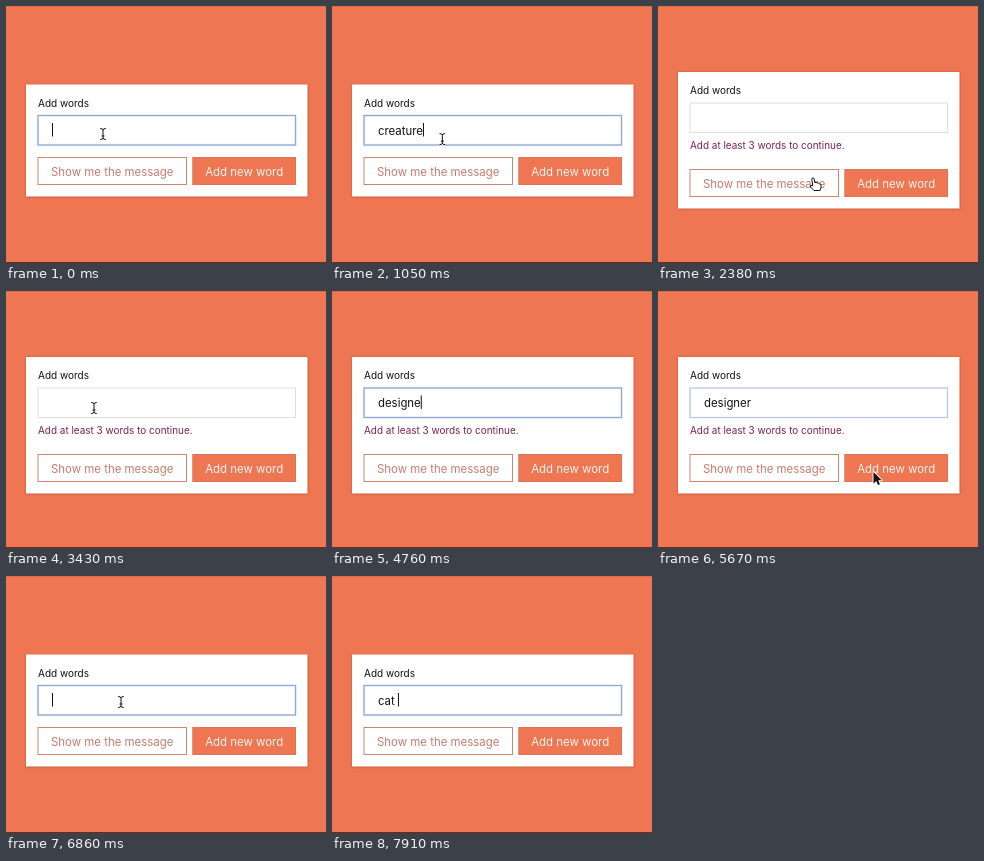
Recreate the animation shown at these times as an HTML page with a canvas. Size 320 px wide and 257 px high, loop 8 s.

```html
<!DOCTYPE html>
<html lang="en">
<head>
<meta charset="utf-8">
<title>Add words</title>
<style>
  html, body { margin: 0; width: 100%; height: 100%; overflow: hidden; background: #ee7652; }
  canvas { display: block; width: 100vw; height: 100vh; }
</style>
</head>
<body>
<canvas id="stage"></canvas>
<script>
const LOOP = 8000, WIDTH = 320, HEIGHT = 257;
const ORANGE = '#ee7652';
const canvas = document.getElementById('stage');
const ctx = canvas.getContext('2d');

// Each word: when its letters appear, and when the field is cleared.
const words = [
  { text: 'creature', keys: [140, 210, 280, 420, 560, 700, 770, 840], clear: 1610 },
  { text: 'designer', keys: [4060, 4200, 4340, 4410, 4480, 4550, 4690, 4830], clear: 5740 },
  { text: 'cat ', keys: [7420, 7560, 7770, 7910], clear: LOOP }
];
const focusSpans = [[-500, 1470], [3570, 5600], [6580, LOOP + 500]];
const errorSpan = [2310, 5740];
const hiddenPointer = [[70, 980], [3990, 5040], [7350, LOOP]];
const caretOff = [7210, 7400];

// Pointer stops: time, x, y
const stops = [
  [0, 97, 128], [980, 97, 128], [1330, 222, 176], [1610, 223.5, 171],
  [1900, 223.5, 171], [2240, 155, 172], [3020, 155, 172], [3360, 88, 117],
  [5000, 88, 117], [5530, 215.5, 181], [6020, 215.5, 181], [6300, 115, 126], [LOOP, 115, 126]
];

const shapes = {
  arrow: new Path2D('M0 0V11.5L2.7 9 4.5 13 6.4 12.2 4.7 8.3H8.2Z'),
  hand: new Path2D('M-1.2 1.2Q-1.2 0 0 0T1.2 1.2L1.8 4.6Q3.2 3.8 4.2 5Q5.6 4.4 6.3 5.8Q8 5.6 8 7.5V9.5L7 12.5H1L-2 9.5Q-3.6 7.4 -2 7.1L-.2 8Z'),
  beam: new Path2D('M-2.8 -5.5Q0 -5.5 0 -4Q0 -5.5 2.8 -5.5M0 -4V4M-2.8 5.5Q0 5.5 0 4Q0 5.5 2.8 5.5M-1.5 2H1.5')
};

const within = (t, [start, end]) => t >= start && t < end;
const clamp = v => Math.max(0, Math.min(1, v));
const smooth = v => v * v * (3 - 2 * v);

function pointerAt(t) {
  const i = stops.findIndex(stop => stop[0] > t);
  const [t0, x0, y0] = stops[i - 1], [t1, x1, y1] = stops[i];
  const k = smooth((t - t0) / (t1 - t0));
  return { x: x0 + (x1 - x0) * k, y: y0 + (y1 - y0) * k };
}

function typedAt(t) {
  const word = words.find(w => t >= w.keys[0] && t < w.clear);
  return word ? word.text.slice(0, word.keys.filter(key => key <= t).length) : '';
}

function focusAt(t) {
  const fade = 120;
  return Math.max(...focusSpans.map(([start, end]) =>
    Math.min(clamp((t - start) / fade), clamp((end + fade - t) / fade))));
}

function write(text, x, y, size, color, align = 'left') {
  ctx.font = `${size}px Inter, sans-serif`;
  ctx.fillStyle = color;
  ctx.textAlign = align;
  ctx.fillText(text, x, y);
}

function outline(x, y, w, h, color, weight = 1) {
  ctx.strokeStyle = color;
  ctx.lineWidth = weight;
  ctx.strokeRect(x, y, w, h);
}

function drawCard(top, height) {
  ctx.save();
  ctx.shadowColor = 'rgba(120, 40, 20, .4)';
  ctx.shadowBlur = 2 * canvas.width / WIDTH;
  ctx.fillStyle = '#fff';
  ctx.fillRect(20, top, 281.5, height);
  ctx.restore();
}

function drawInput(top, t) {
  const focus = focusAt(t), text = typedAt(t);
  const box = [32, top + 31, 257.5, 29.5];
  outline(...box, '#dcdfea');
  ctx.globalAlpha = focus;
  outline(...box, 'rgba(140, 175, 225, .3)', 2.4);
  outline(...box, '#8fa9d3');
  ctx.globalAlpha = 1;

  write(text, 46, top + 50.3, 11.4, '#111');
  const focused = focusSpans.some(span => within(t, span));
  if (focused && !within(t, caretOff)) {
    ctx.fillStyle = '#111';
    ctx.fillRect(46 + ctx.measureText(text).width, top + 38.5, 1, 13.5);
  }
}

function drawButtons(y) {
  outline(32, y, 148.5, 27, '#cb8676');
  write('Show me the message', 106.2, y + 18, 11.45, '#c77c6e', 'center');
  ctx.fillStyle = ORANGE;
  ctx.fillRect(186.5, y - .5, 103.5, 28);
  outline(187, y, 102.5, 27, '#dd7456');
  write('Add new word', 238.2, y + 18, 11.45, '#fff4ef', 'center');
}

function drawPointer(t, inputTop, buttonTop) {
  if (hiddenPointer.some(span => within(t, span))) return;
  const { x, y } = pointerAt(t);
  const overInput = x > 32 && x < 290 && y > inputTop && y < inputTop + 30;
  const overButton = y > buttonTop && y < buttonTop + 28 &&
    ((x > 32 && x < 181) || (x > 186 && x < 290));
  // After the second word is typed the pointer stays an arrow on the button.
  const kind = overInput ? 'beam' : overButton && t < 5000 ? 'hand' : 'arrow';
  const shape = shapes[kind];

  ctx.save();
  ctx.translate(x, y);
  ctx.lineJoin = 'round';
  if (kind === 'hand') {
    ctx.fillStyle = '#fff';
    ctx.fill(shape);
  } else {
    ctx.strokeStyle = '#fff';
    ctx.lineWidth = kind === 'beam' ? 2.4 : 1.8;
    ctx.stroke(shape);
  }
  if (kind === 'arrow') {
    ctx.fillStyle = '#111';
    ctx.fill(shape);
  } else {
    ctx.strokeStyle = '#111';
    ctx.lineWidth = 1;
    ctx.stroke(shape);
  }
  ctx.restore();
}

function draw(t) {
  const hasError = within(t, errorSpan);
  const top = hasError ? 66 : 78.5;
  const extra = hasError ? 24.5 : 0;
  const buttonTop = top + 73 + extra;

  ctx.fillStyle = ORANGE;
  ctx.fillRect(0, 0, WIDTH, HEIGHT);
  ctx.fillStyle = '#d5623f';
  ctx.fillRect(0, 0, WIDTH, .6);
  ctx.fillStyle = '#6e2a1c';
  ctx.fillRect(0, HEIGHT - 1, WIDTH, 1);

  drawCard(top, 112 + extra);
  write('Add words', 32, top + 22.3, 10, '#111');
  drawInput(top, t);
  if (hasError) write('Add at least 3 words to continue.', 32, top + 77.4, 9.95, '#81204f');
  drawButtons(buttonTop);
  drawPointer(t, top + 31, buttonTop);
}

function resize() {
  const ratio = window.devicePixelRatio || 1;
  canvas.width = Math.round(innerWidth * ratio);
  canvas.height = Math.round(innerHeight * ratio);
}

const started = performance.now();
function frame() {
  ctx.setTransform(canvas.width / WIDTH, 0, 0, canvas.height / HEIGHT, 0, 0);
  draw((performance.now() - started) % LOOP);
  requestAnimationFrame(frame);
}

addEventListener('resize', resize);
resize();
frame();
</script>
</body>
</html>
```
